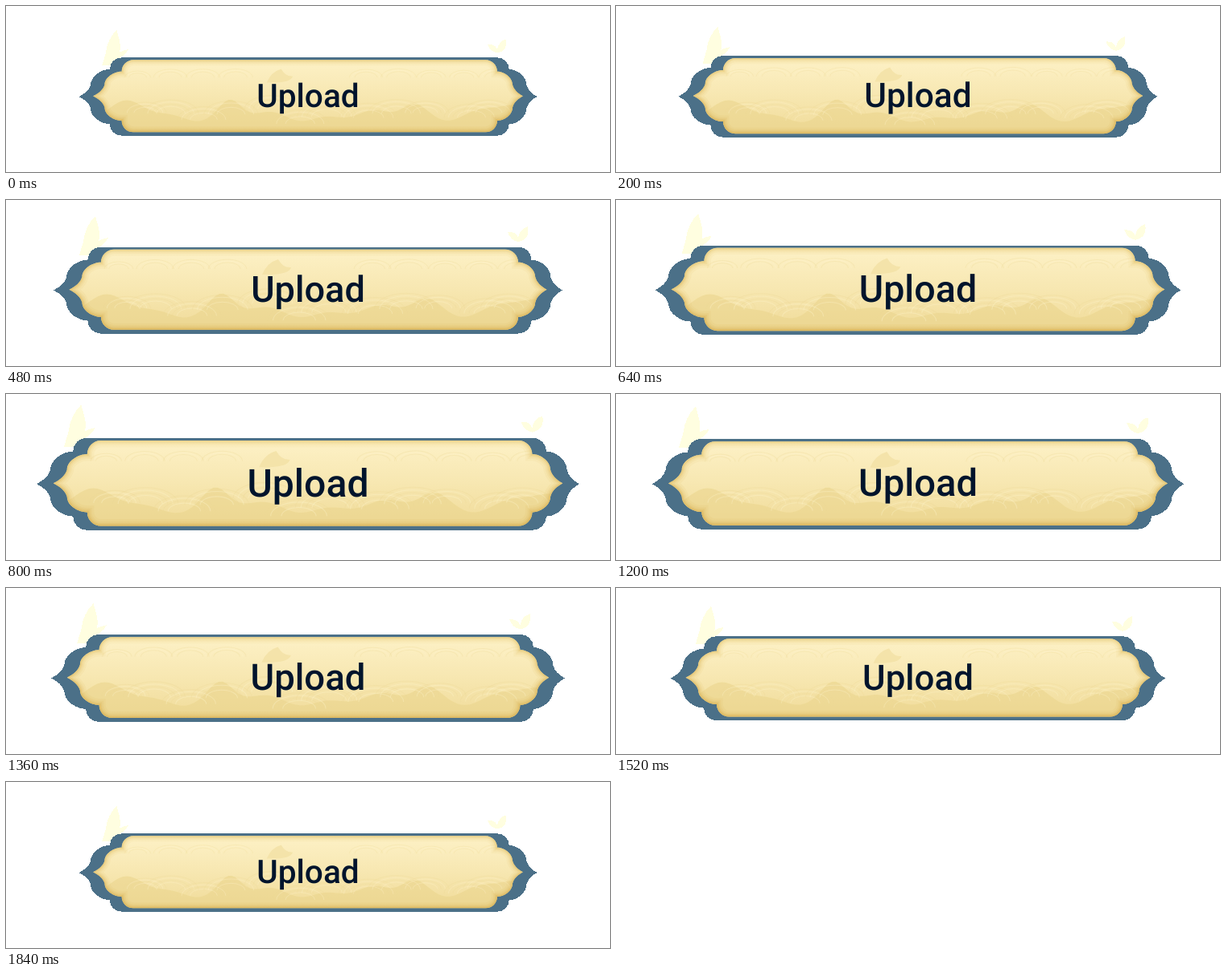
Recreate the animation shown at these times as an HTML page. Size 750x207 px, loop 1880 ms.

```html
<!DOCTYPE html>
<html lang="en">
<head>
<meta charset="utf-8">
<title>Upload button</title>
<style>
  html, body { margin: 0; width: 100%; height: 100%; overflow: hidden; background: #fff; }
  svg { display: block; width: 750px; height: 207px; }
  text { font: 500 45px Roboto, Arial, sans-serif; fill: #00142c; text-anchor: middle; text-rendering: geometricPrecision; }
  .hard { shape-rendering: crispEdges; }
</style>
</head>
<body>
<svg viewBox="0 0 750 207">
  <defs>
    <linearGradient id="face" x1="0" y1="0" x2="0" y2="1">
      <stop offset="0" stop-color="#fdf1c6"/>
      <stop offset=".5" stop-color="#f7e7b1"/>
      <stop offset="1" stop-color="#f0db99"/>
    </linearGradient>
    <linearGradient id="rim" x1="0" y1="0" x2="0" y2="1">
      <stop offset="0" stop-color="#e8cc7b"/>
      <stop offset="1" stop-color="#d8b052"/>
    </linearGradient>
    <clipPath id="inside"><path id="mask"/></clipPath>
  </defs>
  <g id="button">
    <g class="hard" fill="#fffee0">
      <path d="M111 20Q98 33 96 52L91 69H108Q119 50 115 35Z"/>
      <path d="M105 61Q112 49 127 47Q123 57 105 64Z"/>
      <path d="M623 40Q633 39 636 47Q638 36 648 33Q651 49 636 52Q626 50 623 40Z"/>
    </g>
    <path id="back" class="hard" fill="#4b7088"/>
    <path id="front" fill="url(#face)"/>
    <g id="decor" clip-path="url(#inside)" fill="none"></g>
    <text x="375" y="127">Upload</text>
  </g>
</svg>
<script>
const CX = 375, CY = 118, STEP = 40, COUNT = 47, PEAK = 24;
const ROUND = .45; // distance of a curve handle from its corner
const $ = id => document.getElementById(id);

function add(attrs) {
  const el = document.createElementNS('http://www.w3.org/2000/svg', 'path');
  for (const key in attrs) el.setAttribute(key, attrs[key]);
  $('decor').appendChild(el);
}

// Each end has a pointed tip, a round lobe, a notch and a rounded corner.
function plaque({ tip, notch, lobe, top, midY }) {
  const neck = tip + 16, r = top - lobe;
  const quarter = [
    [tip, 0], [tip + 8, 4], [neck - 2, 9], [neck, 16],
    [neck, lobe - ROUND * (lobe - 16)], [notch - ROUND * (notch - neck), lobe], [notch, lobe],
    [notch, top - ROUND * r], [notch + ROUND * r, top], [notch + r, top]
  ];
  const flip = x => 2 * CX - x + 4 * Math.min(1, (x - tip) / (notch - tip));
  const place = (right, low) => quarter.map(([x, y]) => [right ? flip(x) : x, midY + (low ? y : -y)]);
  const curve = p => [1, 4, 7].map(i => 'C' + p.slice(i, i + 3).join(' ')).join('');
  const tl = place(0, 0), tr = place(1, 0).reverse();
  const br = place(1, 1), bl = place(0, 1).reverse();
  return `M${tl[0]}${curve(tl)}L${tr[0]}${curve(tr)}${curve(br)}L${bl[0]}${curve(bl)}Z`;
}

const backShape = plaque({ tip: 59, notch: 101.5, lobe: 38, top: 54, midY: 112.5 });
const frontShape = plaque({ tip: 78.5, notch: 118, lobe: 34, top: 50, midY: 111.7 });
$('back').setAttribute('d', backShape);
for (const id of ['front', 'mask']) $(id).setAttribute('d', frontShape);

let seed = 7;
const random = () => (seed = seed * 16807 % 2147483647) / 2147483647;
const between = (a, b) => a + (b - a) * random();
const bump = (x, at, width) => Math.exp(-(((x - at) / width) ** 2));

// Rolling cloud bank along the lower half
let bank = 'M80 170';
for (let x = 80; x <= 670; x += 5) {
  const y = 139 + 5 * Math.sin(x / 27) + 3 * Math.sin(x / 11)
    - 18 * bump(x, 268, 20) - 18 * bump(x, 520, 24) - 14 * bump(x, 130, 40) - 12 * bump(x, 650, 35);
  bank += `L${x} ${y}`;
}
add({ d: bank + 'L670 170Z', fill: '#ecd68e', opacity: .6 });

// Small peak left of centre
add({ d: 'M318 93Q324 78 338 74Q344 85 354 84Q352 94 318 93Z', fill: '#f3e1a5', opacity: .8 });

// Fanned wave lines
function fan(x, y, r, rings, opacity) {
  for (let i = 0; i < rings; i++) {
    const rx = r * (1 - i * .16), ry = rx * .5;
    add({
      d: `M${x - rx} ${y}A${rx} ${ry} 0 0 1 ${x + rx} ${y}`,
      stroke: i % 2 ? '#fdf2cb' : '#ecd894', opacity
    });
  }
}
for (let x = 140; x < 640; x += 45) {
  if (x < 290 || x > 430) fan(x, 86, between(18, 25), 3, .3);
  fan(x + between(-12, 12), between(128, 152), between(26, 42), 4, .35);
}

for (const width of [16, 11, 7, 3.5])
  add({ d: frontShape, stroke: 'url(#rim)', 'stroke-width': width, opacity: Math.min(.75, 1.8 / width) });

function draw(time) {
  const k = Math.floor(time / STEP) % COUNT;
  const grow = k < PEAK ? k / PEAK : (COUNT - 1 - k) / (COUNT - 1 - PEAK);
  const s = .9 + .2 * grow;
  $('button').setAttribute('transform', `translate(${CX} ${CY}) scale(${s}) translate(${-CX} ${-CY})`);
}

const start = performance.now();
function tick() {
  draw(performance.now() - start);
  requestAnimationFrame(tick);
}
tick();
</script>
</body>
</html>
```
